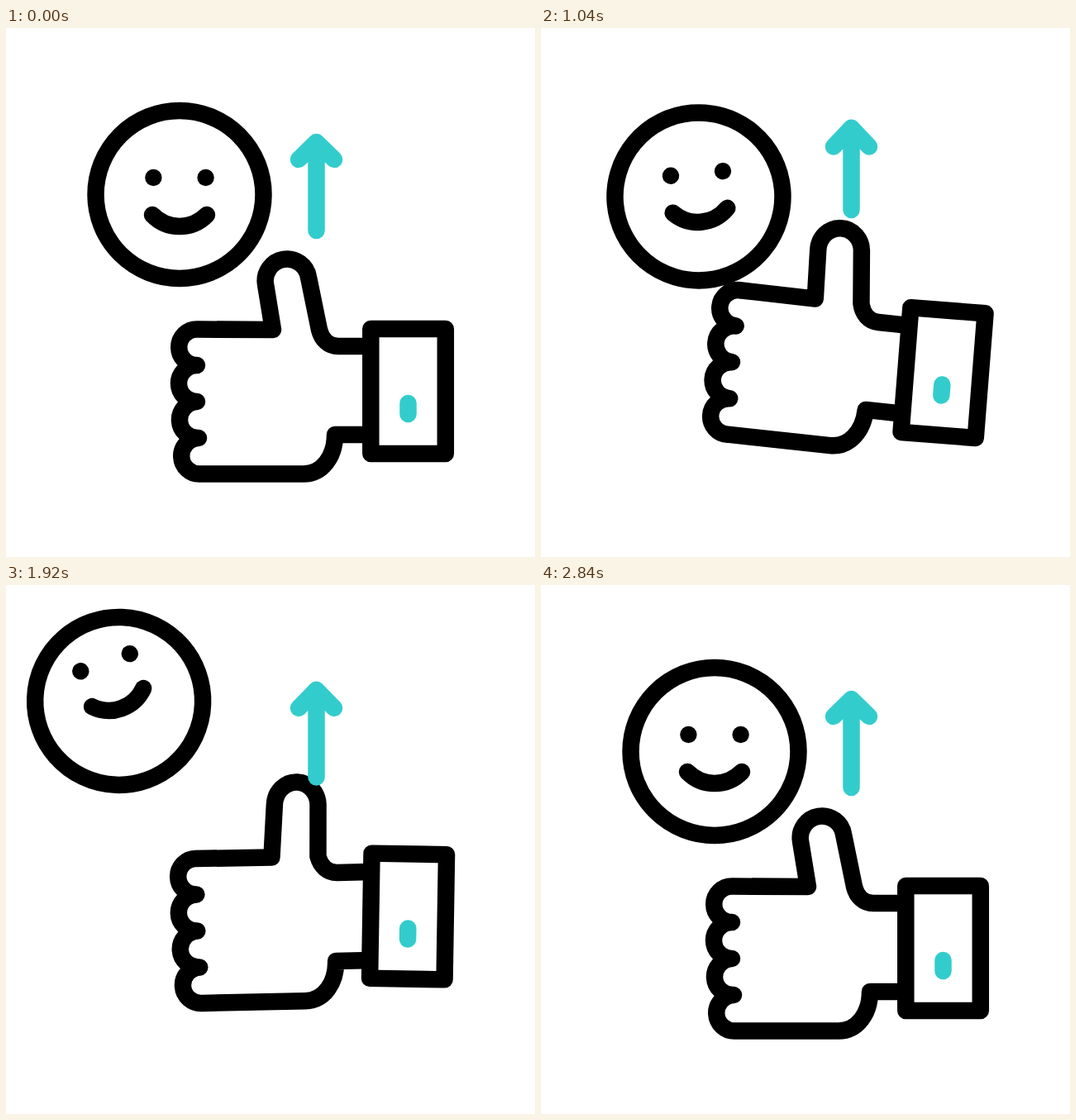
These frames come from a looping animation (640x640 px, 3000 ms). An HTML page:

```html
<!DOCTYPE html>
<html lang="en">
<head>
<meta charset="utf-8">
<title>Thumbs up</title>
<style>
  html, body { margin: 0; width: 100%; height: 100%; overflow: hidden; background: #fff; }
  svg { display: block; width: 100vw; height: 100vh; }
  .line { fill: none; stroke: #000; stroke-width: 20.5; stroke-linecap: round; stroke-linejoin: round; }
  .accent { stroke: #3cc; }
</style>
</head>
<body>
<svg viewBox="0 0 640 640">
  <g id="face">
    <circle class="line" r="101.5"/>
    <g id="features">
      <circle cx="-31.6" cy="-20.5" r="10.2"/>
      <circle cx="31.6" cy="-20.5" r="10.2"/>
      <path class="line" d="M-33 24.5A46 46 0 0 0 33 24.5"/>
    </g>
  </g>
  <path id="hand" class="line"/>
  <g id="cuff">
    <rect class="line" x="-45.2" y="-75.6" width="90.5" height="151.2" style="fill:#fff"/>
    <path class="line accent" d="M0 14.5V27.5"/>
  </g>
  <path id="arrow" class="line accent"/>
</svg>
<script>
const LOOP = 3000, STEP = 40;
const el = id => document.getElementById(id);
const face = el('face'), features = el('features');
const hand = el('hand'), cuff = el('cuff'), arrow = el('arrow');
const move = (node, x, y, deg) => node.setAttribute('transform', `translate(${x} ${y}) rotate(${deg})`);

// Sine ease in and out, from 0 at start to 1 at end; a bend above 1 hurries the first part.
function ease(t, start, end, bend = 1) {
  const u = Math.min(1, Math.max(0, (t - start) / (end - start)));
  return (1 - Math.cos(Math.PI * (1 - (1 - u) ** bend))) / 2;
}

// Swing between poses: each value is reached at its time, beginning at rest.
function swing(rest, times, values) {
  return t => values.reduce((sum, v, i) =>
    sum + (v - (i ? values[i - 1] : rest)) * ease(t, times[i], times[i + 1]), rest);
}

const lift = swing(0, [200, 700, 1200, 2030, 2800], [31, -38.5, -38.5, 0]);
const cuffTurn = swing(0, [200, 720, 1140, 1720, 2090, 2840], [-7.3, 6.3, -6, 6.3, 0]);
const handTurn = swing(0, [200, 720, 1195, 1770, 2105, 2840], [-12.3, 12, -10.5, 11.7, 0]);
const thumbTurn = swing(0, [200, 700, 1250, 2060, 2800], [-9, 13, 13, 0]);
const tip = swing(138, [200, 760, 1390, 1700, 2300, 2800], [172, 48, 160, 48, 138]);
const tail = swing(245, [200, 720, 1380, 1700, 2300, 2800], [262, 174, 257, 174, 245]);
const drop = swing(0, [280, 920, 1860], [25.5, 0]);
const flight = t => ease(t, 920, 1860, 3) - ease(t, 1855, 2540);

// Point of the thumb, turned about its root.
function turn(x, y, deg) {
  const a = deg * Math.PI / 180, c = Math.cos(a), s = Math.sin(a);
  const dx = x - 360, dy = y - 366;
  return `${360 + dx * c - dy * s} ${366 + dx * s + dy * c}`;
}

function handPath(deg) {
  const finger = (x, y) => `A21 21 0 0 0 ${x} ${y}`;
  return 'M441 385H402C390 385 382 377 379 365'
    + `L${turn(366, 301.5, deg)}A26 ${26 + deg * 0.15} ${deg - 9} 0 0 ${turn(314, 310, deg)}`
    + 'L323 365L231 364.5'
    + finger(231, 408) + finger(231, 452) + finger(233, 496) + finger(235, 539.5)
    + 'H360C383 539.5 398 518 398 492H441';
}

function draw(t) {
  const y = lift(t), f = flight(t), top = tip(t);
  const side = top + 21 + (138 - top) * 0.1;
  move(face, 210 - 75 * f, 201.5 + drop(t) * (1 - f) - 62.5 * f, -20 * f);
  move(features, 0, -29.7 * f, 0);
  move(cuff, 486.5, 439.5 + y, cuffTurn(t));
  hand.setAttribute('transform', `translate(0 ${y}) rotate(${handTurn(t)} 467 439)`);
  hand.setAttribute('d', handPath(thumbTurn(t)));
  arrow.setAttribute('d', `M375.5 ${top}V${tail(t)}M354 ${side}L375.5 ${top}L397 ${side}`);
}

const start = performance.now();
function tick() {
  const t = (performance.now() - start) % LOOP;
  draw(Math.floor(t / STEP) * STEP);
  requestAnimationFrame(tick);
}
draw(0);
requestAnimationFrame(tick);
</script>
</body>
</html>
```
